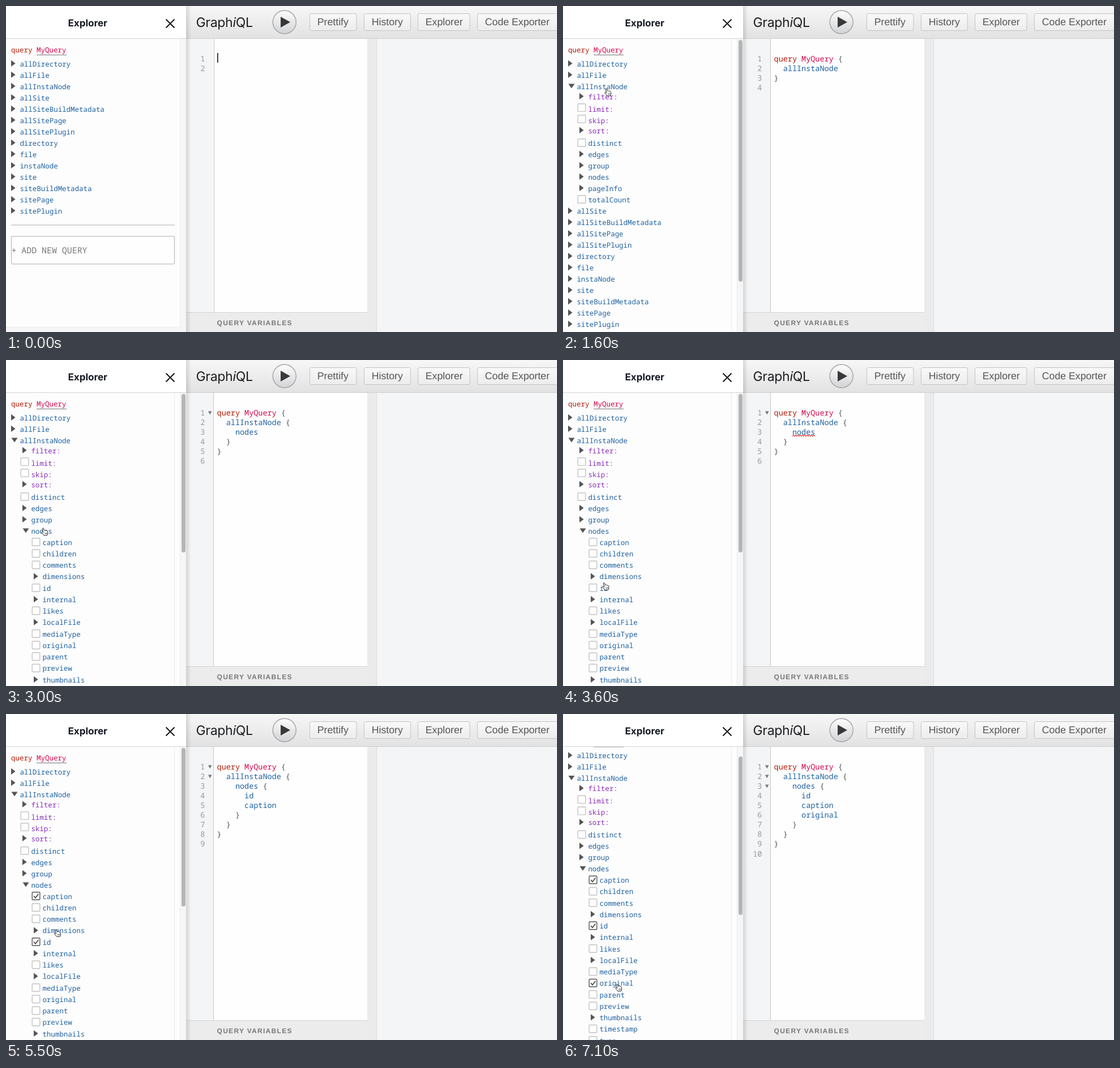
Write an HTML page that moves like this. It is 973 by 576 pixels and loops after 7.2 s.

```html
<!DOCTYPE html>
<html lang="en">
<head>
<meta charset="utf-8">
<title>GraphiQL explorer</title>
<style>
  html, body { margin: 0; width: 100%; height: 100%; overflow: hidden; background: #fff; }
  svg { display: block; width: 973px; height: 576px; }
  text { text-rendering: geometricPrecision; white-space: pre; }
  .mono { font-family: "Noto Sans Mono", monospace; }
  .tree { font-size: 12.46px; }
  .code { font-size: 13.47px; }
  .keyword { fill: #b11a04; }
  .name { fill: #d2054e; }
  .field { fill: #1f61a0; }
  .arg { fill: #8b2bb9; }
  .punct { fill: #555; }
  .num { fill: #999; text-anchor: end; }
  .arrow { fill: #555; }
  .box { fill: #fff; stroke: #c4c4c4; stroke-width: 1.4; }
  .box.on { stroke: #555; }
  .tick { fill: none; stroke: #444; stroke-width: 1.6; }
  .wave { fill: none; stroke: #e02020; stroke-width: 1.1; }
  .btn rect { fill: url(#btn); stroke: #c2c2c2; }
  .btn text { font: 17.7px "Liberation Sans", Arial, sans-serif; fill: #555; }
</style>
</head>
<body>
<svg viewBox="0 0 973 576">
  <defs>
    <linearGradient id="bar" x2="0" y2="1"><stop stop-color="#f7f7f7"/><stop offset="1" stop-color="#e2e2e2"/></linearGradient>
    <linearGradient id="btn" x2="0" y2="1"><stop stop-color="#f9f9f9"/><stop offset="1" stop-color="#ececec"/></linearGradient>
    <linearGradient id="run" x2="0" y2="1"><stop stop-color="#fdfdfd"/><stop offset="1" stop-color="#d2d3d6"/></linearGradient>
    <linearGradient id="shade"><stop stop-opacity=".13"/><stop offset="1" stop-opacity="0"/></linearGradient>
  </defs>

  <!-- editor and result panes -->
  <rect x="318" y="58" width="320" height="518" fill="#fefefe"/>
  <rect x="318" y="58" width="48" height="483" fill="#f4f5f6"/>
  <rect x="638" y="58" width="17" height="518" fill="#ebebec"/>
  <rect x="655" y="58" width="318" height="518" fill="#f4f5f6"/>
  <path d="M654.5 58V576" stroke="#dcdcdc"/>
  <g id="editor"></g>
  <rect id="caret" x="373" y="83" width="1.6" height="17" fill="#111"/>
  <rect x="318" y="541" width="320" height="35" fill="#ececec"/>
  <path d="M318 541.5H638" stroke="#d4d4d4"/>
  <text x="372.5" y="564" fill="#777" font-family="Liberation Sans, Arial, sans-serif" font-size="12" font-weight="700" letter-spacing="1.3">QUERY VARIABLES</text>

  <!-- top bar -->
  <rect x="318" width="655" height="57" fill="url(#bar)"/>
  <path d="M318 57.5H973" stroke="#cdcdcd"/>
  <text x="335.5" y="37" fill="#1c1e21" font-family="Inter, sans-serif" font-size="23" letter-spacing="-.3">Graph<tspan font-style="italic">i</tspan>QL</text>
  <circle cx="491.7" cy="28.5" r="20.5" fill="url(#run)" stroke="#a2a2a2" stroke-width="1.4"/>
  <path d="M485 19V38L502 28.5Z" fill="#383838"/>
  <g id="buttons"></g>
  <rect x="318" width="9" height="576" fill="url(#shade)"/>

  <!-- explorer -->
  <rect width="318" height="576" fill="#fdfdfd"/>
  <g id="bars"></g>
  <g id="tree"></g>
  <rect width="318" height="57" fill="#fff"/>
  <path d="M0 57.5H318" stroke="#d4d4d4"/>
  <text x="144.3" y="36.3" text-anchor="middle" fill="#141823" font-family="Inter, sans-serif" font-size="17" font-weight="700">Explorer</text>
  <path d="M282.5 23.5L297.5 38.5M297.5 23.5L282.5 38.5" stroke="#111" stroke-width="1.9"/>

  <g id="hand" stroke="#222" stroke-width="1" stroke-linejoin="round" fill="#fff">
    <path d="M-3.8 -4.6C-4.2 -6.2 -2.2 -6.6 -1.7 -5.2L-.6 -1.9C.2 -2.7 1.2 -2.4 1.6 -1.6C2.4 -2.3 3.4 -1.9 3.7 -1C4.9 -1.5 5.5 -.6 5.6 .4C5.9 2.4 5.6 4.2 5 6.4L-.9 7C-1.8 5.2 -3.6 3.7 -5 2.2C-5.9 1.1 -4.7 .1 -3.5 .9L-2.3 1.7Z"/>
    <path d="M.6 2.4L1 4.9M2.4 2.1L2.7 4.7M4 1.9V4.4" stroke-width=".7"/>
  </g>
</svg>
<script>
const $ = id => document.getElementById(id);
const LOOP = 7200, STEP = 100;
const CLICKS = [1300, 2900, 3900, 5000, 6500];
const WAVES = { 1: 1800, 2: 3400 };
const FOLDS = [0, 0, 1, 2, 2, 3];
const LEAVES = ['id', 'caption', 'original'];
const CHAR = 8.08, LINE = 17.1;

const ROOTS = 'allDirectory allFile allInstaNode allSite allSiteBuildMetadata allSitePage allSitePlugin directory file instaNode site siteBuildMetadata sitePage sitePlugin'.split(' ');
// A leading "-" marks a leaf with a checkbox, a trailing ":" an argument.
const CHILDREN = 'filter: -limit: -skip: sort: -distinct edges group nodes pageInfo -totalCount'.split(' ');
const NODES = '-caption -children -comments dimensions -id internal -likes localFile -mediaType -original -parent -preview thumbnails -timestamp -type'.split(' ');

// Pointer stops: time, x, y
const PATH = [
  [300, 262, 330], [1000, 79, 152], [2000, 79, 152], [2400, 71, 283], [2500, 71, 283],
  [2800, 68, 303], [3100, 68, 303], [3500, 76, 398], [3800, 73, 404], [4200, 73, 404],
  [4600, 89, 340], [4800, 86, 324], [5200, 86, 324], [5900, 98, 483]
];

const text = (x, y, cls, s) => `<text x="${x}" y="${y}" class="mono ${cls}">${s}</text>`;
const ease = k => k * k * (3 - 2 * k);
const ramp = (t, a, b) => ease(Math.min(1, Math.max(0, (t - a) / (b - a))));

function arrow(x, y, open) {
  const d = open ? `M${x + .5} ${y - 4}h11l-5.5 8z` : `M${x} ${y - 5.7}v11.4l7.6 -5.7z`;
  return `<path class="arrow" d="${d}"/>`;
}

function checkbox(x, y, on) {
  return `<rect class="box${on ? ' on' : ''}" x="${x - 2.8}" y="${y - 6.8}" width="13.6" height="13.6" rx="1"/>` +
    (on ? `<path class="tick" d="M${x} ${y}l3 3.4l5.4 -7"/>` : '');
}

function treeRows(stage) {
  const rows = [];
  let y = 102;
  const add = (raw, level, open, pitch = 20) => {
    rows.push({ raw, level, open, y });
    y += pitch;
  };
  for (const root of ROOTS) {
    const open = root === 'allInstaNode' && stage > 0;
    add(root, 0, open);
    if (!open) continue;
    for (const child of CHILDREN) {
      const inner = child === 'nodes' && stage > 1;
      add(child, 1, inner);
      if (inner) for (const node of NODES) add(node, 2, false, 20.25);
    }
    y += .4;
  }
  return { rows, end: y };
}

function drawTree(stage) {
  const { rows, end } = treeRows(stage);
  const checked = LEAVES.slice(0, Math.max(0, stage - 2));
  let out = text(9, 82, 'tree keyword', 'query') + text(54, 82, 'tree name', 'MyQuery') +
    '<path d="M54 86.5H107" stroke="#777"/>';
  for (const { raw, level, open, y } of rows) {
    const leaf = raw[0] === '-', arg = raw.endsWith(':');
    const label = raw.replace('-', '');
    const x = 9 + 20 * level;
    const dy = arg && !leaf ? -2 : 0;
    out += leaf ? checkbox(x, y - (arg ? 2.4 : .5), checked.includes(label))
                : arrow(x, y + dy - .6, open);
    out += text(x + 15.4, y + dy + 4.6, arg ? 'tree arg' : 'tree field', label);
  }
  const rule = end + 5;
  out += `<path d="M9 ${rule}H298" stroke="#c8c8c8" stroke-width="1.3"/>` +
    `<rect x="9.5" y="${rule + 19.8}" width="288" height="49" rx="2.5" fill="#fefefe" stroke="#bdbdbd" stroke-width="1.2"/>` +
    `<text class="mono" x="9.5" y="${rule + 50}" font-size="14.9" fill="#777">+ ADD NEW QUERY</text>`;
  $('tree').innerHTML = out;
}

function drawEditor(stage, wavy) {
  const names = ['allInstaNode', 'nodes'].slice(0, stage);
  const leaves = LEAVES.slice(0, Math.max(0, stage - 2));
  const lines = [];
  const brace = '<tspan class="punct"> {</tspan>';
  if (stage) {
    lines.push([0, 'keyword', `query <tspan class="name">MyQuery</tspan>${brace}`]);
    names.forEach((n, i) => lines.push([i + 1, 'field', n + (names[i + 1] || leaves.length ? brace : '')]));
    leaves.forEach(n => lines.push([3, 'field', n]));
    for (let d = leaves.length ? names.length : names.length - 1; d >= 0; d--) lines.push([d, 'punct', '}']);
  }
  const count = stage ? lines.length + 1 : 2;
  const edge = stage ? 366 : 367;
  let out = `<path d="M${edge}.5 58V541" stroke="#c6c6c6"/>`;
  for (let i = 0; i < count; i++) out += text(351.3, 97.6 + i * LINE, 'code num', i + 1);
  for (let i = 0; i < FOLDS[stage]; i++) out += `<path d="M357 ${90.5 + i * LINE}h6.4l-3.2 6z" fill="#777"/>`;
  lines.forEach(([depth, cls, s], i) => {
    out += text(372.6 + depth * 2 * CHAR, 97.6 + i * LINE, 'code ' + cls, s);
  });
  if (wavy) {
    const n = names.length;
    const x = 372.6 + n * 2 * CHAR, w = names[n - 1].length * CHAR;
    out += `<path class="wave" d="M${x} ${100.5 + n * LINE}${'l2 -2l2 2'.repeat(Math.round(w / 4))}"/>`;
  }
  $('editor').innerHTML = out;
}

function drawBars(stage, scroll) {
  const edge = '<rect x="307" y="58" width="11" height="518" fill="#f6f6f6"/><path d="M307.5 58V576" stroke="#ececec"/>';
  if (!stage) {
    $('bars').innerHTML = edge + '<rect y="567" width="318" height="9" fill="#f6f6f6"/><path d="M0 567.5H307" stroke="#ececec"/>';
    return;
  }
  const h = stage > 1 ? 280 : 427;
  $('bars').innerHTML = edge + '<path d="M297.5 58V576" stroke="#ebebeb"/>' +
    `<rect x="310" y="${60 + scroll * 15}" width="7" height="${h}" rx="3.5" fill="#b5b5b5"/>`;
}

function pointer(t) {
  let i = 0;
  while (i < PATH.length - 1 && PATH[i + 1][0] <= t) i++;
  const a = PATH[i], b = PATH[i + 1] || a;
  const k = b === a ? 0 : ramp(t, a[0], b[0]);
  return [a[1] + (b[1] - a[1]) * k, a[2] + (b[2] - a[2]) * k];
}

$('buttons').innerHTML = [['Prettify', 536.5, 82.5], ['History', 632.5, 82], ['Explorer', 727.5, 91.5], ['Code Exporter', 832.5, 142]]
  .map(([label, x, w]) => `<g class="btn"><rect x="${x}" y="13.5" width="${w}" height="30" rx="3"/><text x="${x + 13.3}" y="34">${label}</text></g>`)
  .join('');

let last = '';
function render(now) {
  const t = Math.floor((now % LOOP) / STEP) * STEP;
  const stage = CLICKS.filter(c => c <= t).length;
  const wavy = t >= WAVES[stage];
  const scroll = ramp(t, 5600, 5900);
  const key = stage + '/' + wavy;
  if (key !== last) {
    drawTree(stage);
    drawEditor(stage, wavy);
    last = key;
  }
  drawBars(stage, scroll);
  $('tree').setAttribute('transform', `translate(0 ${-28.5 * scroll})`);
  $('caret').setAttribute('visibility', !stage && t % 1060 < 530 ? 'visible' : 'hidden');
  const [x, y] = pointer(t);
  $('hand').setAttribute('transform', `translate(${x} ${y})`);
  $('hand').setAttribute('visibility', t >= PATH[0][0] ? 'visible' : 'hidden');
}

const start = performance.now();
function tick() {
  render(performance.now() - start);
  requestAnimationFrame(tick);
}
tick();
</script>
</body>
</html>
```
